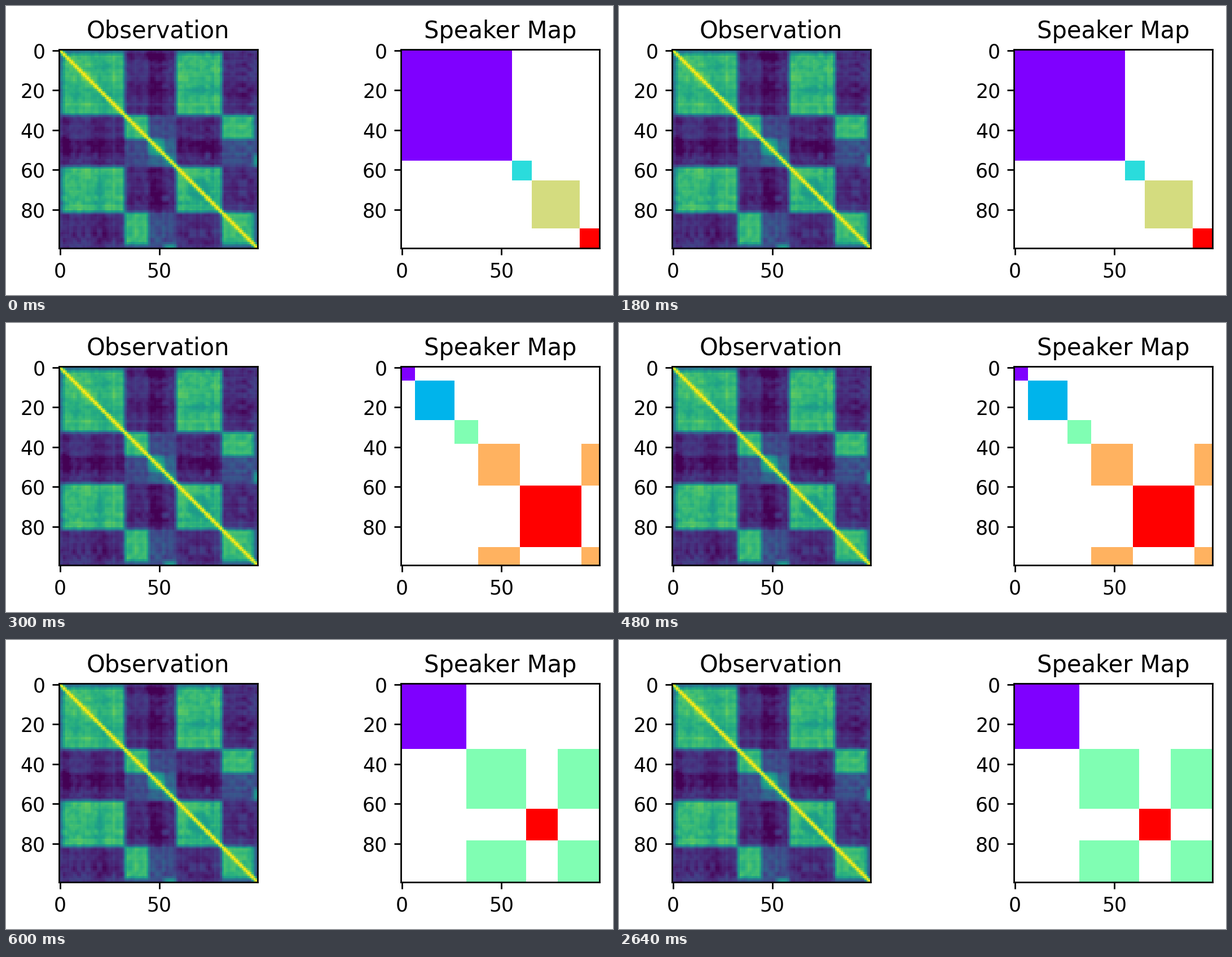
Write a matplotlib script that moves like this. It is 1076 px wide and 512 px high and loops after 4 s.

```python
import matplotlib.pyplot as plt
import numpy as np
from matplotlib.animation import FuncAnimation

W, H, DPI = 1076, 512, 250
N = 100
SIDE = 351.7
TOP = 77.4
STEP = 100  # ms per frame

# Segment ends and the voice heard in each segment
ENDS = [2, 33, 45, 53, 59, 82, 98, N]
VOICES = "eabcdabx"
LEVELS = {
    "ee": 0.55, "ae": 0.36, "be": 0.17, "ce": 0.08, "de": 0.14, "ex": 0.2,
    "aa": 0.66, "ab": 0.13, "ac": 0.03, "ad": 0.11, "ax": 0.16,
    "bb": 0.68, "bc": 0.25, "bd": 0.22, "bx": 0.3,
    "cc": 0.6, "cd": 0.33, "cx": 0.25,
    "dd": 0.45, "dx": 0.52, "xx": 0.6,
}

# Each clustering: start time in ms, segment ends, cluster of each segment
STAGES = [
    (0, [56, 66, 90, N], [0, 1, 2, 3]),
    (300, [7, 27, 39, 60, 91, N], [0, 1, 2, 3, 4, 3]),
    (600, [33, 63, 79, N], [0, 1, 2, 1]),
]


def spread(ends, values):
    return np.repeat(values, np.diff([0] + ends))


def blur(m):
    p = np.pad(m, 1, mode="edge")
    m = (p[:-2] + 2 * p[1:-1] + p[2:]) / 4
    return (m[:, :-2] + 2 * m[:, 1:-1] + m[:, 2:]) / 4


def smooth_noise(rng, width):
    v = np.convolve(rng.normal(size=N + 4 * width), np.hanning(width + 2), "same")
    v = v[2 * width:2 * width + N]
    return (v - v.mean()) / v.std()


def similarity():
    rng = np.random.default_rng(8)
    voice = spread(ENDS, list(VOICES))
    base = np.array([[LEVELS["".join(sorted(a + b))] for b in voice] for a in voice])
    m = blur(base)

    # Slow drift, fine streaks and patches shared by rows and columns
    t = np.arange(N)
    drift = np.interp(t, [0, 8, 13, 18, 22, 27, 33, 59, 63, 70, 77, 82, 99],
                      [0, 0, 0.03, -0.02, -0.04, 0.025, 0, 0, 0.02, -0.025, -0.02, 0, 0])
    drift = drift + 0.01 * smooth_noise(rng, 1) + 0.006 * smooth_noise(rng, 4)
    m = m + drift[:, None] + drift[None, :]
    for width in (3, 3, 4, 5, 6, 7):
        u = smooth_noise(rng, width)
        m += 0.011 * np.outer(u, u) * rng.choice([-1, 1])

    # Neighbouring times are alike, less so across a change of voice
    gap = np.abs(t[:, None] - t)
    m += (1 - m) * np.exp(-0.4 * gap ** 2)
    return np.clip(m, 0, 1)


def speaker_map(ends, clusters):
    label = spread(ends, clusters)
    same = label[:, None] == label
    colors = plt.get_cmap("rainbow")(label / label.max())[:, :3]
    return np.where(same[..., None], colors[:, None], 1.0)


def panel(x, title, data):
    ax = fig.add_axes([x / W, 1 - (TOP + SIDE) / H, SIDE / W, SIDE / H])
    image = ax.imshow(data, cmap="viridis", vmin=0, vmax=1,
                      interpolation="nearest", aspect="auto")
    ax.set_title(title)
    ax.set_xticks([0, 50])
    ax.set_yticks(range(0, N, 20))
    return image


maps = [speaker_map(ends, clusters) for _, ends, clusters in STAGES]

fig = plt.figure(figsize=(W / DPI, H / DPI), dpi=DPI, facecolor="white")
panel(94.0, "Observation", similarity())
speakers = panel(700.45, "Speaker Map", maps[0])


def update(frame):
    stage = sum(frame * STEP >= start for start, _, _ in STAGES) - 1
    speakers.set_data(maps[stage])
    return [speakers]


anim = FuncAnimation(fig, update, frames=4000 // STEP, interval=STEP,
                     repeat=True, repeat_delay=0)
plt.show()
```
